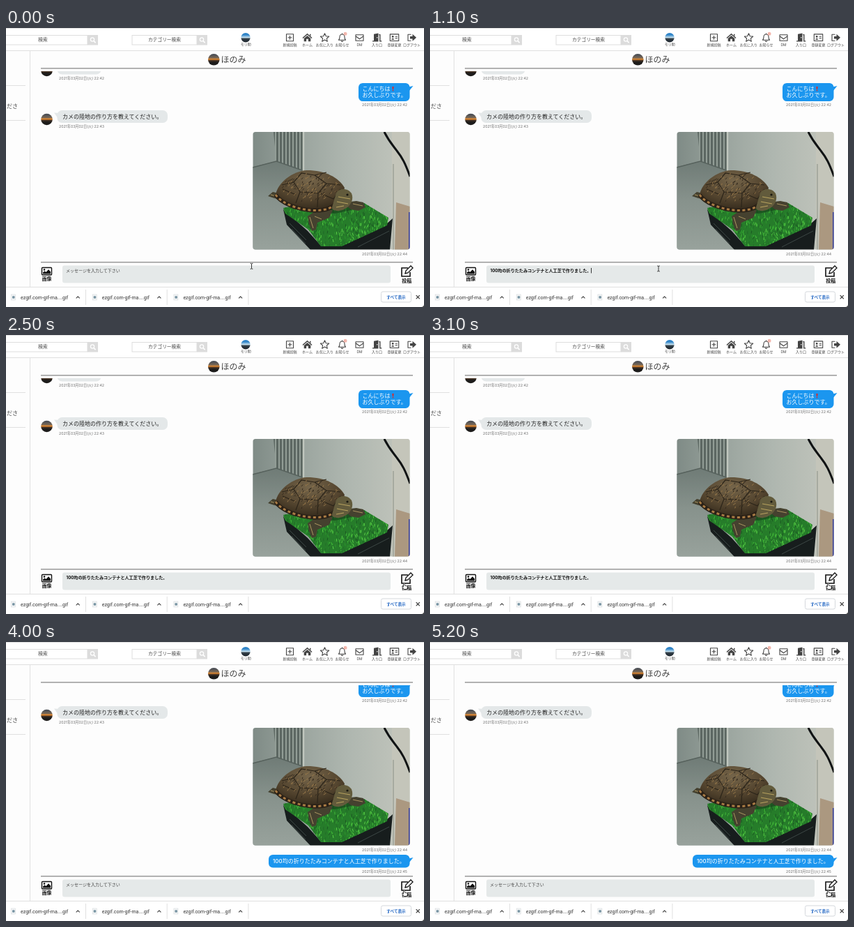
These frames come from a looping animation (600 by 400 pixels, 5300 ms). An HTML page:

```html
<!DOCTYPE html>
<html lang="ja">
<head>
<meta charset="utf-8">
<style>
html, body { margin: 0; width: 100%; height: 100%; overflow: hidden; background: #fdfdfd; }
svg { display: block; width: 600px; height: 400px; }
text { font-family: Inter, "Noto Sans CJK JP", "Noto Sans CJK", sans-serif; fill: #444; white-space: pre; }
.date { font-size: 5.2px; fill: #6c6c6c; }
.msg { font-size: 8px; font-weight: 500; fill: #222; }
.blue { fill: #fff; }
.file { font: 7px Roboto, sans-serif; fill: #333; }
.link { font-weight: 700; fill: #2468c4; }
.bold { font-weight: 700; fill: #111; }
.icon, .line { fill: none; stroke: #444; stroke-width: 1.1; stroke-linejoin: round; stroke-linecap: round; }
.solid { fill: #444; stroke: none; }
.line { stroke: #e0e0e0; stroke-width: 1; stroke-linecap: butt; }
.hr { stroke: #858585; stroke-width: 1.2; }
</style>
</head>
<body>
<svg id="stage" viewBox="0 0 600 400">
  <defs>
    <linearGradient id="dusk" x2="0" y2="1">
      <stop offset=".1" stop-color="#4d5056"/><stop offset=".36" stop-color="#7c6955"/>
      <stop offset=".47" stop-color="#e68b30"/><stop offset=".58" stop-color="#4a3424"/><stop offset=".72" stop-color="#1d1c1b"/>
    </linearGradient>
    <linearGradient id="sky" x2="0" y2="1">
      <stop offset=".2" stop-color="#2f84c8"/><stop offset=".5" stop-color="#c9e2ee"/>
      <stop offset=".6" stop-color="#35414a"/><stop offset="1" stop-color="#1c242b"/>
    </linearGradient>
    <linearGradient id="wall">
      <stop offset="0" stop-color="#7f8b86"/><stop offset=".3" stop-color="#9aa49e"/>
      <stop offset=".6" stop-color="#aeb6af"/><stop offset="1" stop-color="#c3c6bd"/>
    </linearGradient>
    <linearGradient id="floor" x2="0" y2="1">
      <stop offset="0" stop-color="#6f7b76"/><stop offset=".45" stop-color="#87928c"/><stop offset="1" stop-color="#98a29c"/>
    </linearGradient>
    <radialGradient id="shell" cx=".48" cy=".25" r=".75">
      <stop offset="0" stop-color="#75654a"/><stop offset=".6" stop-color="#54452f"/><stop offset="1" stop-color="#33291b"/>
    </radialGradient>
    <clipPath id="list"><rect x="36" y="62" width="564" height="271"/></clipPath>
    <clipPath id="frame"><rect x="354.5" y="149" width="225" height="168.5" rx="3.5"/></clipPath>
    <clipPath id="turf"><path d="M398 258L437 250L514 251L549 272L547 283L482 313L452 313L434 289L401 266Z"/></clipPath>
  </defs>
</svg>
<script>
const stage = document.getElementById('stage');
const LOOP = 5300, PASTE = 800, BLUR = 2800, SEND = 3200, SCROLL = 26;
const note = '100均の折りたたみコンテナと人工芝で作りました。';

const text = (x, y, s, size, cls = '', anchor = 'start') =>
  `<text x="${x}" y="${y}" class="${cls}" text-anchor="${anchor}"${size ? ` style="font-size:${size}px"` : ''}>${s}</text>`;
const path = (d, attrs = 'class="icon"') => `<path d="${d}" ${attrs}/>`;
const rect = (x, y, w, h, fill, rx = 0, more = '') =>
  `<rect x="${x}" y="${y}" width="${w}" height="${h}" fill="${fill}" rx="${rx}" ${more}/>`;
const disc = (x, y, r, fill) => `<circle cx="${x}" cy="${y}" r="${r}" fill="${fill}"/>`;
const date = (x, y, time) => text(x, y, `2021年03月02日(火) ${time}`, 0, 'date');
const at = (x, y, body) => `<g transform="translate(${x} ${y})">${body}</g>`;
const rule = d => path(d, 'class="line"');

let seed = 7;
const rnd = () => (seed = seed * 16807 % 2147483647) / 2147483647;

function search(x, w, label, mid) {
  const b = x + w;
  return rect(x, 10.5, w, 13.5, '#fff', 0, 'stroke="#ddd"') + rect(b, 10, 15, 14.5, '#dcdcdc') +
    `<circle cx="${b + 7}" cy="16.5" r="2.6" fill="none" stroke="#fff" stroke-width="1.3"/>` +
    path(`M${b + 9} 18.5l2.6 2.6`, 'stroke="#fff" stroke-width="1.6"') + text(mid, 19.3, label, 6.7, '', 'middle');
}

const solid = 'class="solid"';
const menu = [
  ['新規投稿', path('M-5 -5H5V5H-5ZM0 -2.5V2.5M-2.5 0H2.5')],
  ['ホーム', path('M-7 .3L0 -6L7 .3L6 1.3L0 -4L-6 1.3ZM-4.8 1.4L0 -2.7L4.8 1.4V5.5H1.4V2H-1.4V5.5H-4.8ZM3.5 -5H5V-2L3.5 -3.3Z', solid)],
  ['お気に入り', path('M0 -6L1.8 -2L6.2 -1.6L2.9 1.3L3.8 5.6L0 3.4L-3.8 5.6L-2.9 1.3L-6.2 -1.6L-1.8 -2Z')],
  ['お知らせ', path('M-5 3.5Q-3.5 2 -3.5 -1C-3.5 -6 3.5 -6 3.5 -1Q3.5 2 5 3.5ZM-1.3 5Q0 6.6 1.3 5M0 -5.8V-4.8') + disc(4.5, -5.5, 2.5, '#f3b7ad')],
  ['DM', path('M-5.5 -4H5.5V4.5H-5.5ZM-5.5 -2L0 2L5.5 -2')],
  ['入り口', path('M-4.5 -5L2 -6.2V5.8H-6.5V4.5H-4.5ZM2.8 -4.8H5V4.5H6.8V5.8H3.6V-3.5H2.8Z', solid) + disc(.3, 0, .8, '#fff')],
  ['登録変更', path('M-6.2 -4.8H6.2V4.8H-6.2ZM1.5 -1.5H4M1.5 1H4') + disc(-2.3, -1.3, 1.4, '#444') + path('M-4.5 3Q-2.3 -1 -.1 3Z', solid)],
  ['ログアウト', path('M-1.5 -4.5H-5.5V4.5H-1.5') + path('M-2.5 -1.8H1V-5L6.5 0L1 5V1.8H-2.5Z', solid)],
];

function header() {
  return rect(0, 0, 600, 32, '#fff') + rule('M0 .5H600M0 32.5H600') +
    search(-6, 123, '検索', 53) + search(181, 93, 'カテゴリー検索', 227.5) +
    disc(344, 13.8, 6.7, 'url(#sky)') + text(344.3, 25.2, 'モリ助', 5, '', 'middle') +
    menu.map(([label, icon], i) => at(407.5 + 25 * i, 13.7, icon + text(0, 12, label, 5, '', 'middle'))).join('');
}

function photo() {
  let s = rect(354, 149, 226, 169, 'url(#wall)');
  s += path('M354 199L388 191L428 205L400 250L437 318H354Z', 'fill="url(#floor)"');
  s += path('M384 149H426V204L388 191Z', 'fill="#5c6762"');
  for (let i = 0; i < 8; i++) s += path(`M${387 + i * 5} 149V${191 + i * 1.7}`, 'stroke="#929d96" stroke-width="2"');
  s += path('M354 200L388 191L428 205', 'fill="none" stroke="#56615c" stroke-width="1.5"');
  s += path('M427 149V207', 'stroke="#c0c7be" stroke-width="2.5"');
  s += path('M554 149H580V318H554Z', 'fill="#c4c5ba"') + path('M556 195V318', 'stroke="#9da197" stroke-width="1.5"');
  s += path('M560 250L580 256V318H558Z', 'fill="#ab9880"') + path('M579 264V318', 'stroke="#3740a0" stroke-width="2"');
  s += path('M543 149C550 163 556 169 561 176C569 186 573 194 580 213', 'fill="none" stroke="#101314" stroke-width="3"');

  // Tray and artificial grass
  s += path('M398 260L403 282L437 318H551L555 273L546 281L482 312L452 312L433 291Z', 'fill="#171d1d"');
  s += path('M407 280L431 304M410 288L430 309M505 314L550 291', 'stroke="#3c4745" fill="none"');
  s += '<g clip-path="url(#turf)">' + rect(395, 245, 160, 75, '#267c2a');
  const greens = ['#1a5822', '#2c952d', '#3fb837', '#59cf45', '#226d28'];
  for (let i = 0; i < 650; i++) {
    const x = 396 + rnd() * 154, y = 250 + rnd() * 66;
    s += path(`M${x.toFixed(1)} ${y.toFixed(1)}l${(rnd() * 3 - 1.5).toFixed(1)} -4`, `stroke="${greens[i % 5]}"`);
  }
  s += path('M400 252L437 264L472 266L515 257L508 252L480 246Z', 'fill="#15351b" opacity=".55"') + '</g>';

  // Turtle
  const skin = 'fill="#45412f"';
  s += path('M395 238L383 235L376 241L385 244L396 246Z', skin);
  s += path('M446 261L433 270L435 281L439 291L445 289L447 279L464 272L469 261Z', skin);
  s += path('M482 250L495 260L506 262L516 257L513 250L503 248L494 249Z', skin);
  s += path('M436 271L441 287M443 270L453 274M498 252L512 255M380 239L391 242', 'fill="none" stroke="#aa9460"');
  const dome = 'M387 239C390 222 411 205 432 204C458 204 477 214 486 229C483 243 474 257 458 261C431 265 396 253 387 239Z';
  const rim = 'M387 239C396 253 431 266 459 260C471 257 479 248 484 234';
  s += path(dome, 'fill="url(#shell)"');
  s += path(rim, 'fill="none" stroke="#2a2117" stroke-width="6"');
  s += path(rim, 'fill="none" stroke="#a97b44" stroke-width="3" stroke-dasharray="4 3.5"');
  s += path('M396 225L413 221L424 208L443 211L460 207M413 221L422 235L448 237L460 223L443 211M460 223L480 225M422 235L416 251M448 237L447 257M397 231L416 239M451 237L470 245L480 231', 'fill="none" stroke="#2b2419" stroke-width="1.2"');
  for (let i = 0; i < 110; i++) {
    const a = rnd() * 6.283, r = Math.sqrt(rnd());
    s += path(`M${(436 + 41 * r * Math.cos(a)).toFixed(1)} ${(230 + 20 * r * Math.sin(a)).toFixed(1)}l${(rnd() * 4).toFixed(1)} -2.5`,
      `stroke="${i % 2 ? '#9b7b4b' : '#30281c'}" stroke-width=".9"`);
  }
  s += path('M473 240C475 229 490 228 496 237C500 247 494 256 485 260C477 264 467 262 468 257Z', 'fill="#625b3c"');
  s += path('M475 249L491 252M477 242L494 245M474 257L485 255', 'fill="none" stroke="#b6a15e" stroke-width="1.2"');
  s += disc(490, 239, 1.6, '#171711');
  return `<g clip-path="url(#frame)">${s}</g>`;
}

const blue = '#1b96ef', gray = '#e4e8e9';
const mine = (x, y, w, h) => rect(x, y, w, h, blue, 6) + path(`M576 ${y + 6}L584.5 ${y + 4}L578 ${y + 12}Z`, `fill="${blue}"`);

function messages() {
  return disc(58.5, 61, 8.3, 'url(#dusk)') + rect(73.5, 48, 63, 18.5, gray, 7) + date(76, 73.5, '22:42') +
    mine(506, 79, 73.5, 26) + text(511.5, 90.3, 'こんにちは', 0, 'msg blue') +
    path('M554.3 84h2.4l-.6 4.2h-1.2Z', 'fill="#d92c2c"') + disc(555.5, 89.6, .9, '#d92c2c') +
    text(511.5, 99, 'お久しぶりです。', 0, 'msg blue') + date(511, 112, '22:42') +
    disc(58.5, 131, 8.3, 'url(#dusk)') + rect(73.5, 118, 158.5, 18, gray, 7) +
    path('M69 121.5L78 122L75 130Z', `fill="${gray}"`) +
    text(81, 130, 'カメの陸地の作り方を教えてください。', 0, 'msg') + date(76, 143, '22:43') +
    photo() + date(511, 325.5, '22:44') +
    `<g id="sent">${mine(377, 331, 202.5, 18.5)}${text(383, 343.2, note, 0, 'msg blue')}${date(511, 356.5, '22:45')}</g>`;
}

function form() {
  return path('M50 335.8H584', 'class="hr"') +
    rect(51.5, 343.5, 14, 10.5, 'none', 1, 'stroke="#111" stroke-width="1.4"') + disc(55, 346.5, 1.3, '#111') +
    path('M53 352.5V350.5L55.5 348.5L57.5 350L61 346.3L64 349.5V352.5Z', 'fill="#111"') +
    text(58.5, 362, '画像', 6.8, 'bold', 'middle') + rect(81, 340.5, 471, 25, '#e5e9e9', 3) +
    `<g id="hint">${text(86, 350, 'メッセージを入力して下さい', 6)}</g>` +
    `<g id="draft">${text(86.5, 350, note, 6.1, 'bold')}</g>` +
    path('M231.5 344V351.5', 'id="caret" stroke="#222" stroke-width=".9"') +
    path('M577 344H568V356H580V350', 'fill="none" stroke="#111" stroke-width="1.6"') +
    path('M573 352L574 348L581 341L584 344L577 351Z', 'fill="#fff" stroke="#111" stroke-width="1.3"') +
    text(575.3, 365, '投稿', 7, 'bold', 'middle');
}

function downloads() {
  const item = i => at(116.7 * i, 0,
    rect(7.5, 382, 6, 8, '#f3f5f6', 0, 'stroke="#d5dadc" stroke-width=".6"') + rect(9, 384.3, 3.5, 3.5, '#7894a3', 1) +
    text(21, 388.5, 'ezgif.com-gif-ma....gif', 0, 'file') +
    path('M101 387.2L103.2 385L105.4 387.2') + rule('M114.5 375V397'));
  return rect(0, 371, 600, 29, '#fff') + rule('M0 371.5H600') + [0, 1, 2].map(item).join('') +
    rect(538.5, 378, 43, 15, '#fff', 2.5, 'stroke="#d5d8dc"') +
    text(560, 387.8, 'すべて表示', 5.6, 'link', 'middle') +
    path('M589 383.5L593.5 388M593.5 383.5L589 388') + path('M600 396Q600 400 596 400H600Z', 'fill="#333"');
}

const cursors =
  path('M-1.8 -4Q0 -4 0 -3V3Q0 4 -1.8 4M1.8 -4Q0 -4 0 -3M0 3Q0 4 1.8 4', 'id="beam" fill="none" stroke="#222" stroke-width=".9"') +
  path('M0 -4V3.4L1.6 2L2.8 4.7L4.2 4L3 1.5H5.2Z', 'id="arrow" fill="#111" stroke="#fff" stroke-width=".6"') +
  path('M-1 -4Q0 -5 .7 -4V-1L4.3 0Q5 .3 4.7 2L4 4.5H0L-3 1Q-2.5 -.5 -1 1Z', 'id="hand" fill="#fff" stroke="#222" stroke-width=".8"');

stage.insertAdjacentHTML('beforeend',
  rect(0, 0, 600, 400, '#fdfdfd') + header() +
  rule('M34.5 32V371M0 82.5H28M0 132.5H28') + text(1, 115, 'ださ', 8) +
  disc(298.3, 45.3, 8.3, 'url(#dusk)') + text(308.5, 49.8, 'ほのみ', 12) + path('M50 57.8H584', 'class="hr"') +
  `<g clip-path="url(#list)"><g id="log">${messages()}</g></g>` +
  form() + downloads() + `<g id="pointer">${cursors}</g>`);

const $ = id => document.getElementById(id);
const show = (id, on) => $(id).setAttribute('visibility', on ? 'visible' : 'hidden');
const move = (id, x, y) => $(id).setAttribute('transform', `translate(${x} ${y})`);
const ease = (t, a, b) => {
  const p = Math.min(1, Math.max(0, (t - a) / (b - a)));
  return p * p * (3 - 2 * p);
};

function draw(now) {
  const t = Math.floor(now % LOOP / 100) * 100;
  const filled = t >= PASTE && t < SEND;
  show('draft', filled);
  show('hint', !filled);
  show('caret', filled && t < BLUR && (t - PASTE) % 1000 < 500);
  show('sent', t >= SEND);
  move('log', 0, -SCROLL * ease(t, SEND - 100, SEND + 400));

  const a = ease(t, 0, 600), b = ease(t, 1400, 2000), c = ease(t, 2000, 2500);
  const x = 352.5 - 24.5 * a + 228 * b + 15.5 * c;
  const y = 341.5 + 3.5 * a + 18.5 * b - 3.5 * c;
  move('pointer', x, y);
  show('beam', y < 356 && x < 552);
  show('arrow', x < 566 && (y >= 356 || x >= 552));
  show('hand', x >= 566);
  requestAnimationFrame(draw);
}
requestAnimationFrame(draw);
</script>
</body>
</html>
```
